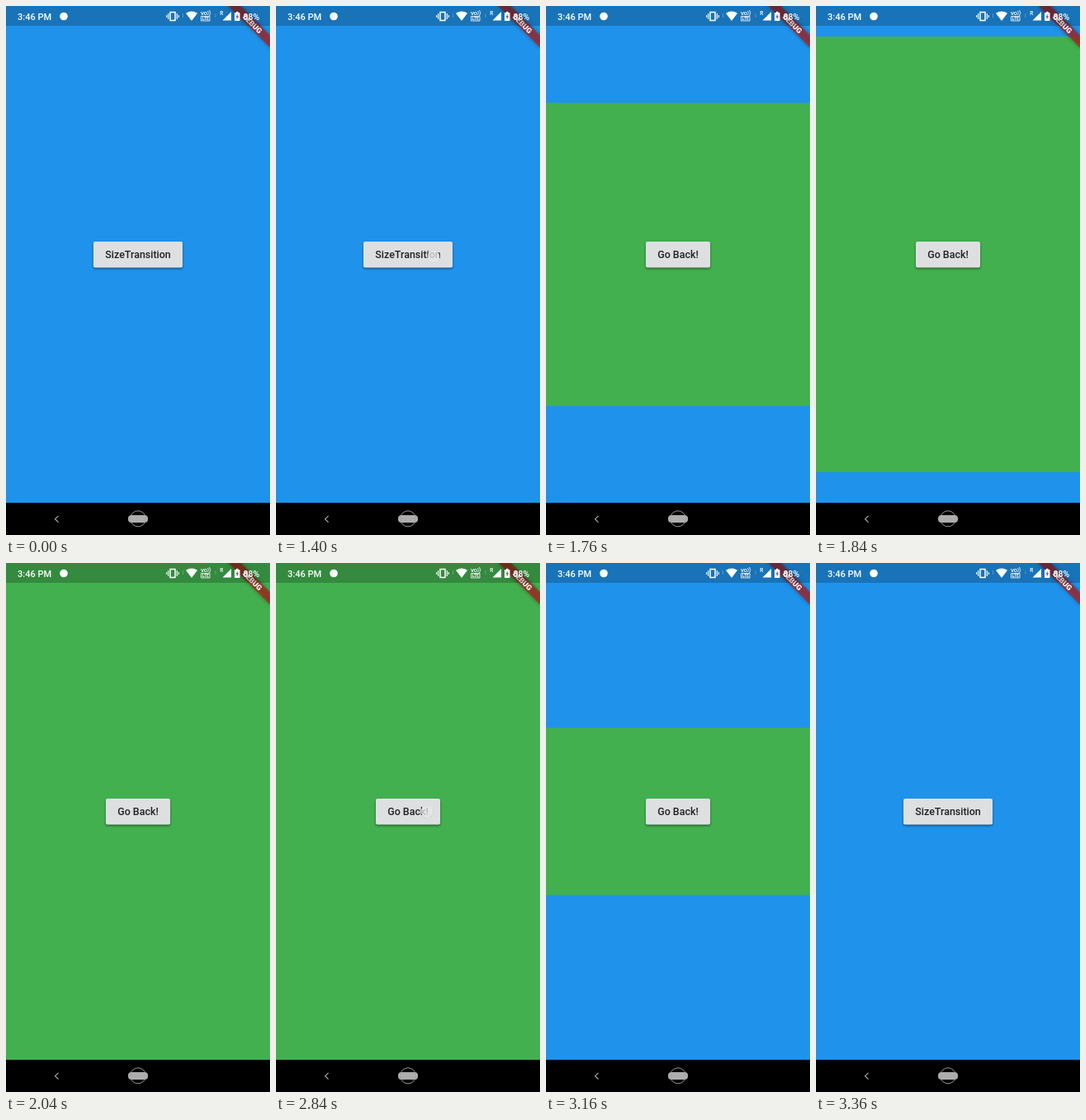
An HTML page with a canvas that plays this animation: 320 by 640 pixels, repeating every 3.48 s.

```html
<!DOCTYPE html>
<html lang="en">
<head>
<meta charset="utf-8">
<title>Size transition</title>
<style>
  html, body { margin: 0; width: 100%; height: 100%; overflow: hidden; background: #000; }
  canvas { display: block; width: 320px; height: 640px; }
</style>
</head>
<body>
<canvas id="stage" width="320" height="640"></canvas>
<script>
const ctx = document.getElementById('stage').getContext('2d');
const LOOP = 3480, STEP = 40;
const WIDTH = 320, VIEW = 601, MIDDLE = VIEW / 2;
const BLUE = '#1f93eb', GREEN = '#43b050';
const clamp = x => Math.max(0, Math.min(1, x));

function rect(x, y, w, h, fill, radius = 0) {
  ctx.fillStyle = fill;
  ctx.beginPath();
  ctx.roundRect(x, y, w, h, radius);
  ctx.fill();
}

function circle(x, y, r, fill) {
  ctx.fillStyle = fill;
  ctx.beginPath();
  ctx.arc(x, y, r, 0, Math.PI * 2);
  ctx.fill();
}

function polygon(points, fill) {
  ctx.fillStyle = fill;
  ctx.fill(new Path2D(`M${points}Z`));
}

function stroke(path, color, width = 1) {
  ctx.strokeStyle = color;
  ctx.lineWidth = width;
  ctx.stroke(new Path2D(path));
}

function text(label, x, y, size, weight = 500, color = '#fff', align = 'center') {
  ctx.font = `${weight} ${size}px Roboto, sans-serif`;
  ctx.textAlign = align;
  ctx.fillStyle = color;
  ctx.fillText(label, x, y);
}

function shadow(color, blur, y) {
  ctx.shadowColor = color;
  ctx.shadowBlur = blur;
  ctx.shadowOffsetY = y;
}

function button(label, width, t, press) {
  const x = 160 - width / 2, y = 285, h = 31.5;
  ctx.save();
  shadow('rgba(0,0,0,.45)', 3, 1.5);
  rect(x, y, width, h, '#dedfe1', 2);
  ctx.restore();

  const age = t - press.down;
  if (age >= 0 && age < 400) {
    const fade = 1 - clamp((t - press.up) / 200);
    ctx.save();
    ctx.beginPath();
    ctx.roundRect(x, y, width, h, 2);
    ctx.clip();
    circle(press.x, press.y, 8 + age / 4, `rgba(0,0,0,${0.07 * fade})`);
    ctx.restore();
  }
  text(label, 160, 305, 12.44, 500, '#202124');
}

function touch(t, { down, up, x, y }) {
  if (t >= down && t < up) circle(x, y, 7.5, 'rgba(235,236,238,.75)');
}

function banner() {
  ctx.save();
  ctx.translate(WIDTH, 0);
  ctx.rotate(Math.PI / 4);
  shadow('rgba(0,0,0,.5)', 5, 0);
  rect(-36, 24.9, 72, 10.7, 'rgba(183,28,28,.68)');
  ctx.shadowColor = 'transparent';
  text('DEBUG', 0, 33.5, 9, 900);
  ctx.restore();
}

function statusBar() {
  text('3:46 PM', 14, 17, 11, 500, '#fff', 'left');
  circle(70, 12.5, 4.8, '#fff');

  // vibrate
  stroke('M199 7.5h6v10h-6z', '#fff', 1.5);
  stroke('M196.7 9v7M207.3 9v7M194.7 11v3M209.3 11v3', '#fff', 1.1);
  rect(214, 9, 1, 5, 'rgba(255,255,255,.25)');

  // wifi
  ctx.fillStyle = '#fff';
  ctx.fill(new Path2D('M218 8.8Q225 4 232 8.8L225 18Z'));

  // voice over data
  text('VO', 240, 11, 6, 700);
  stroke('M244.5 6q2 2.5 0 5M246.5 5q2.5 3.5 0 7', '#fff', 0.8);
  stroke('M236.5 12.5h10.5v5.5h-10.5z', '#fff', 0.8);
  text('LTE', 241.8, 17.3, 5, 700);
  rect(253.5, 9, 1, 5, 'rgba(255,255,255,.25)');

  // signal and battery
  text('R', 261.3, 11, 6.5, 500);
  polygon('273 7 273 17.5 262.5 17.5', '#fff');
  rect(277, 8, 6.5, 10, '#fff', 0.8);
  rect(279, 6.8, 2.5, 2, '#fff');
  polygon('280.8 9.5 278.6 13.5 280 13.5 279.7 16.5 282 12.3 280.5 12.3', '#7d4a63');
  text('88%', 287.5, 17, 10.5, 500, '#fff', 'left');
}

function navBar() {
  rect(0, VIEW, WIDTH, 39, '#000');
  stroke('M63.5 616.8L59.5 620.7L63.5 624.6', '#b4b4b4', 1.1);
  rect(148, 616, 24, 9, '#adadad', 4);
  stroke('M150.5 620.3a9.5 9.5 0 1 0 19 0a9.5 9.5 0 1 0 -19 0', '#a5a5a5', 0.9);
}

const openPress = { down: 1400, up: 1520, x: 191, y: 303 };
const backPress = { down: 2840, up: 2920, x: 183, y: 300.5 };

function draw(t) {
  const open = clamp((t - 1577) / 300) - clamp((t - 2961) / 300);
  const height = VIEW * open;

  rect(0, 0, WIDTH, VIEW, BLUE);
  button('SizeTransition', 108, t, openPress);

  if (height > 0) {
    ctx.save();
    ctx.beginPath();
    ctx.rect(0, MIDDLE - height / 2, WIDTH, height);
    ctx.clip();
    rect(0, 0, WIDTH, VIEW, GREEN);
    button('Go Back!', 78, t, backPress);
    ctx.restore();
  }

  banner();
  rect(0, 0, WIDTH, 24, 'rgba(0,0,0,.22)');
  statusBar();
  navBar();
  touch(t, openPress);
  touch(t, backPress);
}

const start = performance.now();
function frame() {
  const t = (performance.now() - start) % LOOP;
  draw(Math.floor(t / STEP) * STEP);
  requestAnimationFrame(frame);
}
frame();
</script>
</body>
</html>
```
